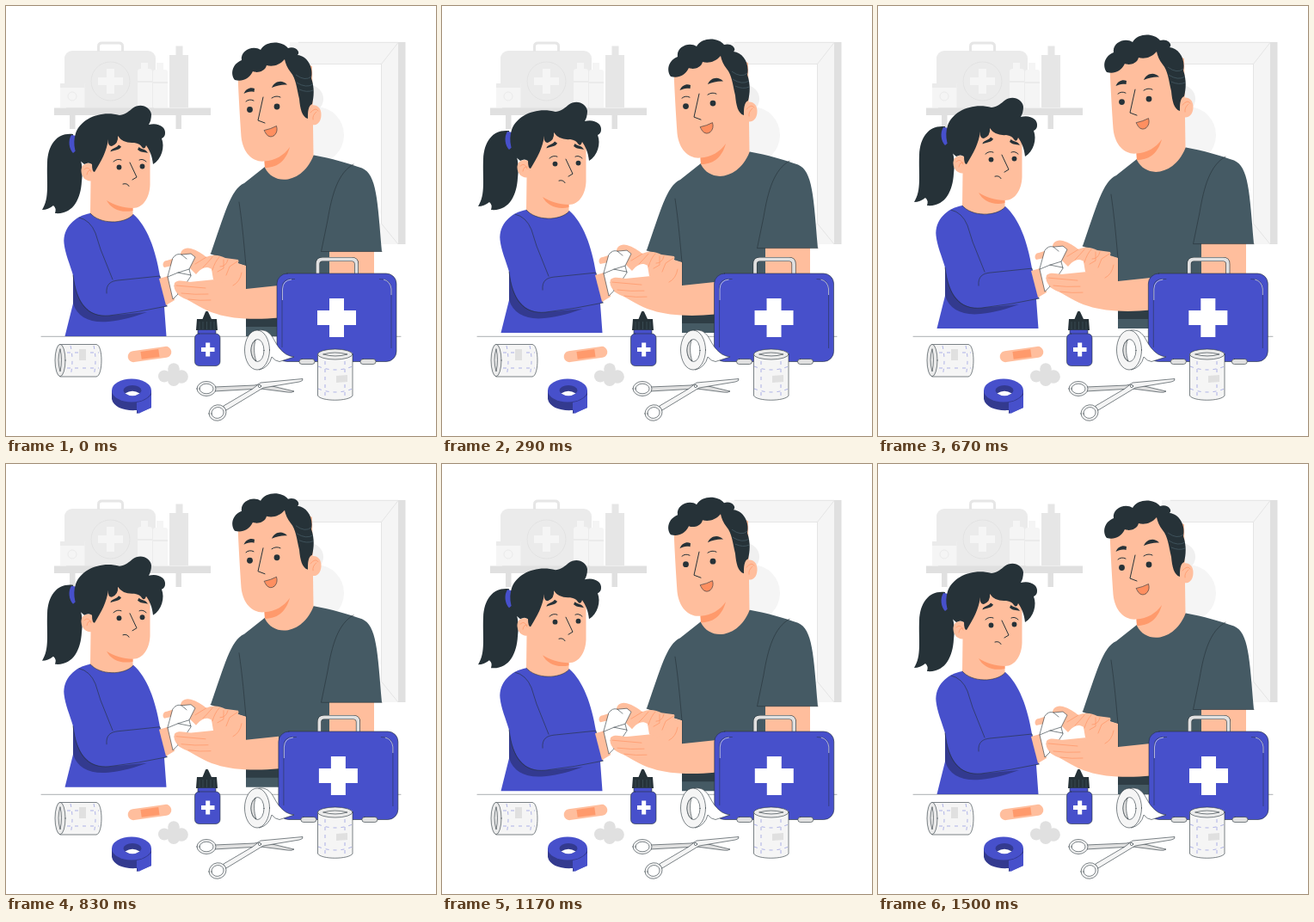
Animation, 500 px wide and 500 px high, one loop 1540 ms. Source, as an HTML page:

```html
<!DOCTYPE html>
<html lang="en">
<head>
<meta charset="utf-8">
<title>First aid</title>
<style>
html, body { margin: 0; width: 100%; height: 100%; overflow: hidden; background: #fff; }
svg { display: block; width: 100vw; height: 100vh; }
.skin { fill: #ffbe9d; }
.peach { fill: #ff9a6c; }
.hair { fill: #263238; }
.blue { fill: #4750cb; }
.navy { fill: #333a8f; }
.shirt { fill: #455a64; }
.g1 { fill: #f5f5f5; }
.g2 { fill: #ebebeb; }
.g3 { fill: #e0e0e0; }
.w { fill: #fff; }
.ink { fill: none; stroke: #263238; stroke-width: 1; stroke-linecap: round; stroke-linejoin: round; }
.fine { stroke-width: .6; }
.thin { stroke: #263238; stroke-width: .6; stroke-linejoin: round; stroke-linecap: round; }
.crease { fill: none; stroke: #ff9a6c; stroke-width: .8; stroke-linecap: round; }
.stitch { fill: none; stroke: #8f94e0; stroke-width: .7; stroke-dasharray: 4 5; }
</style>
</head>
<body>
<svg viewBox="0 0 500 500" preserveAspectRatio="none">
  <!-- room -->
  <g>
    <path class="g1" d="M330 42H456V277H330Z"/>
    <path class="w" d="M345 67.500H436.500V253H345Z"/>
    <path class="g3" d="M456 42h8.500v235h-8.500Z"/>
    <path d="M340 42.300H456M345 67.500H436.500V253M436.500 67.500L456 42.500M436.500 253L456 277" fill="none" stroke="#e0e0e0" stroke-width=".8"/>
    <circle class="g1" cx="360" cy="150" r="33"/>
    <circle fill="#f0f0f0" cx="353" cy="108" r="16"/>
    <rect class="g2" x="68" y="52" width="106" height="70" rx="9"/>
    <path d="M107.500 53V47q0-4 4-4h20q4 0 4 4v6" fill="none" stroke="#e6e6e6" stroke-width="3"/>
    <circle cx="121.500" cy="87.500" r="22.500" fill="none" stroke="#e0e0e0" stroke-width=".8"/>
    <path class="g1" d="M117 73h9v10h10v9h-10v10h-9v-10h-10v-9h10Z"/>
    <path class="g1" d="M63 90h28.500v28H63Z"/>
    <path class="g2" d="M63 90h28.500v5H63Z"/>
    <circle cx="77" cy="105" r="5" fill="none" stroke="#ebebeb"/>
    <path class="g1" d="M157 66h8v7h2q3 0 3 3v42h-17V76q0-3 3-3h1Z"/>
    <path class="g1" d="M175 66h8v8h2q3 0 3 3v41h-17V77q0-3 3-3h1Z"/>
    <path class="g2" d="M153 87h17v2h-17ZM171 88h17v2h-17Z"/>
    <path fill="#e6e6e6" d="M197.500 46.500h8V57h6.500v61h-22V57h7.500Z"/>
    <path class="g3" d="M56 118.500H238V127H204v16h-6.500V127H80.500v16H74V127H56Z"/>
  </g>

  <g id="people">
    <!-- man -->
    <path class="skin" d="M376 280H428V330H376Z"/>
    <path class="shirt" d="M301 187L277 206C261 213 254 243 238 288L279 302V384H376V285.500H437C432 225 431 196 414 188.500C398 183 378 177 358 173.500Z"/>
    <path fill="#2e3d45" d="M279 358H330V373H279Z"/>
    <path class="ink fine" d="M271 228C275 255 277 280 279 302V330M404 184C386 194 379 219 374 249L366.500 285.500H437M238 288L279 302"/>
    <path class="skin" d="M269.500 80C270.500 105 272 130 273.500 152C275.500 172 288 182 300.500 180.500L301 188C312 210 345 206 357.500 174L356 70L320 55Z"/>
    <path class="peach" d="M300.500 180.500C313 179.500 323 174 330 164C325 182 314 188 301 188Z"/>
    <path class="skin" d="M350 119C356 112 367 115 366.500 127C366 138 358 141 351 136Z"/>
    <path class="crease" d="M354 124Q360 117 363 122M357 132Q356 127 361 123"/>
    <path class="hair" d="M266 86C261 80 262 68 274 63C272 51 288 45 296 51C302 40 321 40 328 49C337 46 343 54 339 57C350 58 358 71 355 84C359 95 358 106 356 114C351 116 351 124 351 131C344 129 342 119 341 108C338 95 337 84 331 77C327 72 325 67 324 62C318 69 310 71 303 69C301 77 291 78 287 76C282 86 274 88 266 86Z"/>
    <path d="M337 80Q348 88 355 82M338 89Q349 96 357 91M341 97Q350 101 357 98" fill="none" stroke="#455a64" stroke-width=".8"/>
    <path class="hair" d="M276.500 102C279 95.500 285 94 289 96L288.500 100C284 99 280 100 276.500 102ZM309 95C312 87.500 321 85 327 91.500C321 91 315 92.500 309 95Z"/>
    <circle class="hair" cx="283.500" cy="120.500" r="3.400"/>
    <circle class="hair" cx="315" cy="117" r="3.400"/>
    <path class="ink" d="M279 111Q283 107.500 288 110M309 107Q314 103.500 319 106M299 106L293 133L301 136"/>
    <path class="thin" fill="#ff8f60" d="M300.500 144.500Q308 143 314.500 139.500Q316.500 146 312 150.500Q307 154 303 149.500Z"/>

    <!-- girl -->
    <path class="hair" d="M78 149C60 147 49 160 48 182C47 205 51 223 42 237Q49 237 55 232Q59 235 57 241C78 243 87 224 88 204C90 188 88 178 81 166Z"/>
    <path class="blue" d="M76 150C72 156 73 166 78 171L84 166L82 151Z"/>
    <path class="blue" d="M98 241C80 244 66 258 67.500 276C69 289 74 299 78 313V346L68.500 384H186.500L184 350L187 349L179 314C174 283 164 256 148 242Z"/>
    <path class="navy" d="M78 313V346C83 362 98 369 119 367C137 365 150 361 164 356L120 360C98 362 82 347 78 313Z"/>
    <path class="ink fine" d="M85 246Q98 249 104 264L110 283L124 318M117 334C116 323 122 320 130 319L179 314L187 349M78 313C82 347 95 362 120 360Q155 356 187 349"/>
    <path class="skin" d="M99 165L98 241C109 254 137 254 147.500 243V235C160 235 167 222 167.500 208V160L130 145Z"/>
    <path class="ink fine" d="M98 241C109 254 137 254 147.500 243"/>
    <path class="peach" d="M117 226C126 232 136 234.500 147.500 235V238C134 241 122 236 117 226Z"/>
    <path class="skin" d="M102 185C95 180 87 184 87.500 192C88 200 94 205 101 203Z"/>
    <path class="crease" d="M91 190Q96 185 99 193M94 196Q95 190 99 191"/>
    <path class="hair" d="M91 184C80 176 77 160 81 148C87 131 110 121 132 127C140 126 143 122 147 119C156 112 168 117 169 126Q169 133 166 138C177 135 186 141 185 148Q185 152 181 154C185 164 181 178 171 184C170 174 167 168 163 162Q161 168 158 164Q156 160 149 159Q136 160 130 151Q131 160 123 163Q118 163 119 155C117 169 111 180 103 193Q100 193 100 184Q96 181 91 184Z"/>
    <path class="hair" d="M121.500 169.500C122 165 128 166 131 161.500L134 163.500C132 168 126 167 121.500 169.500ZM153 167L154.500 164C158 167.500 162 165.500 165 171C160 169.500 157 170.500 153 167Z"/>
    <circle class="hair" cx="131.500" cy="187.500" r="2.900"/>
    <circle class="hair" cx="158.500" cy="186.500" r="2.900"/>
    <path class="ink" d="M125 181Q129 177 134 179M155 179Q159 177 163 181M144 182L152 199L147 202M136 207Q141 205.500 143 209.500"/>

    <!-- hands -->
    <path class="skin" d="M178 317L192 313L196 342L186 348Z"/>
    <path class="skin" d="M196 323C200 319 207 320 213 321L243 318L262 297L279 302V329L317 325V362.500C291 365 262 364 245 358C229 354 218 344 207 340C198 336 193 329 196 323Z"/>
    <path class="skin" d="M184 304C181 301 183 296 187 296L203 291C202 284 208 280 215 282C222 284 228 288 233 292C241 288 249 290 255 293L270 295C272 299 267 301 264 306L251 322L241 318L239 306C232 301 226 306 221 312L212 303L198 301Z"/>
    <path class="crease" d="M233 292L220 300M240 292Q234 299 229 304M248 292Q243 297 240 307M253 295V305L246 309M258 295Q256 303 249 303M269 297L260 303L256 313M264 325Q272 321 274 310"/>
    <path class="w thin" d="M194 293Q198 287 204 289L215 288L220 292L213 306L215 314L209 323L196 325L200 335L194 341L188 315Z"/>
    <path class="ink fine" d="M188 315L200 310L213 306M204 289L210 294M200 310L215 313"/>
    <path class="skin" d="M196 322C200 318 207 320 214 321L233 324V334L206 338C198 335 194 329 196 322Z"/>
    <path class="crease" d="M198 325L232 328M204 334Q220 336 235 335M212 341Q226 343 238 342"/>
  </g>

  <path class="ink" style="stroke-width:.4" d="M41 384.300H459"/>

  <g id="kit">
    <path d="M362.500 312V300q0-5.500 5.500-5.500h34q5.500 0 5.500 5.500v12" fill="none" stroke="#263238" stroke-width="5"/>
    <path d="M362.500 312V300q0-5.500 5.500-5.500h34q5.500 0 5.500 5.500v12" fill="none" stroke="#e0e0e0" stroke-width="3.800"/>
    <rect class="blue thin" x="315" y="311" width="139" height="102.500" rx="12"/>
    <path d="M321 397V328Q321 318 331 317.500H336M434 317.500Q448 317 448 329V398" fill="none" stroke="#263238" stroke-width=".5"/>
    <path d="M321.500 342V329Q322 319 332 318M448 336V329Q447 320 439 318" fill="none" stroke="#fff" stroke-width=".6"/>
    <path class="w" d="M376 340h17v14h14v17h-14v14h-17v-14h-14v-17h14Z"/>
    <rect class="g3 thin" x="341" y="410.500" width="18" height="6" rx="3"/>
    <rect class="g3 thin" x="412" y="410.500" width="18" height="6" rx="3"/>
  </g>

  <!-- table items -->
  <g>
    <path class="g1 thin" d="M63 393.500H105C113 394 113 430 105 431H63Z"/>
    <ellipse class="g2 thin" cx="63" cy="412" rx="6" ry="18.700"/>
    <path class="ink fine" d="M63 399Q59 411 63 425Q66 411 63 399"/>
    <path class="stitch" d="M71 403H108M71 421H108M75 395Q79 412 75 430M102 395Q106 412 102 430"/>
    <path class="g3" d="M85 399h8v13h-8Z"/>

    <g transform="rotate(-8 167 405)">
      <rect class="skin" x="141.500" y="398.500" width="51" height="13" rx="6.500"/>
      <rect class="peach" x="157" y="400.500" width="21" height="9"/>
    </g>

    <path class="hair" d="M232 355.500q1.500-1.500 3 0L239 364h6l1 13h-25l1-13h6.500Z"/>
    <path d="M225 367v9M229 367v9M233.500 367v9M238 367v9M242 367v9" stroke="#455a64" stroke-width=".6"/>
    <rect class="blue thin" x="223" y="376.500" width="21" height="5" rx="1"/>
    <rect class="blue thin" x="219.500" y="381" width="29.500" height="37.500" rx="5"/>
    <path class="w" d="M232.200 391.500h5v5.500h5.300v5h-5.300v5.500h-5v-5.500H227v-5h5.200Z"/>

    <g class="g3">
      <circle cx="195" cy="422" r="6.800"/><circle cx="184" cy="430.500" r="7"/>
      <circle cx="204" cy="431" r="7.800"/><circle cx="195" cy="435" r="7"/>
      <circle cx="194.500" cy="428" r="7"/>
    </g>

    <path class="navy" d="M123 447V457C125 467 138 471 152 470V474L169 467V447Z"/>
    <path class="blue" d="M152 461Q163 459 169 452V467L154 474L152 469Z"/>
    <ellipse class="blue" cx="146" cy="447" rx="23" ry="13.500"/>
    <ellipse class="navy" cx="147" cy="447" rx="10.500" ry="6"/>
    <path class="w" d="M138.500 450.500Q147 445 155.500 450.500Q147 456 138.500 450.500Z"/>

    <g class="g1 thin">
      <path class="g3" d="M242 443L289 441L297 439L335 448Q333 450 327 449L296 445L242 448Z"/>
      <path d="M253 465L287 445L296 438L345 433.500Q346 436 341 437L299 444L256 470Z"/>
      <path fill-rule="evenodd" d="M222 445a11 8.500 0 1 0 22 0a11 8.500 0 1 0 -22 0ZM225 445a8 5.800 0 1 1 16 0a8 5.800 0 1 1 -16 0Z"/>
      <path fill-rule="evenodd" d="M236 474a10 9 -20 1 0 20 -2a10 9 -20 1 0 -20 2ZM239 474a7 6.200 -20 1 1 14 -2a7 6.200 -20 1 1 -14 2Z"/>
      <circle class="w" cx="295" cy="442" r="1.600"/>
    </g>

    <path class="w thin" d="M294 377C309 375 311 390 318 398Q325 407 335 408L318 413.500Q313 413 309 408Q306 420 295 423Z"/>
    <ellipse class="g1 thin" cx="292" cy="400" rx="14.500" ry="23"/>
    <ellipse class="w thin" cx="292.500" cy="400.500" rx="7.500" ry="13"/>
    <path class="g3 thin" d="M290 388.500C283 393 283 408 291 413C288 405 288 395 290 388.500Z"/>

    <path class="g1 thin" d="M362.500 405V453C366 460 399 460 403 453V405Z"/>
    <ellipse class="g2 thin" cx="382.800" cy="405" rx="20.300" ry="6"/>
    <path class="ink fine" d="M369 405Q382 401 397 405Q383 409 369 405"/>
    <path class="stitch" d="M371 413V456M394 413V456M363 419Q383 427 403 419M363 445Q383 453 403 445"/>
    <path class="g3" d="M384 430l13-1v8l-13 1Z"/>
  </g>
</svg>
<script>
const LOOP = 1540, CYCLE = 1500, LEAD = 24, FPS = 24, LIFT = 10;
const SHAKE = [0, -1, 2, -4, 4, -4, 4, -4, 2, -1, 0];
const people = document.getElementById('people');
const kit = document.getElementById('kit');

function lift(p) {
  return -LIFT * (1 - Math.abs(1 - 2 * p));
}

function shake(p) {
  const x = p * 10, i = Math.floor(x);
  return SHAKE[i] + (SHAKE[i + 1] - SHAKE[i]) * (x - i);
}

// Poses advance at a fixed rate; both motions share one cycle.
function draw(now) {
  const step = Math.floor(((now % LOOP) + 4) * FPS / 1000);
  const p = ((step * 1000 / FPS + LEAD) % CYCLE) / CYCLE;
  const rest = LEAD / CYCLE;
  people.setAttribute('transform', `translate(0 ${lift(p) - lift(rest)})`);
  kit.setAttribute('transform', `translate(${shake(p) - shake(rest)} 0)`);
}

const start = performance.now();
function tick() {
  draw(performance.now() - start);
  requestAnimationFrame(tick);
}
tick();
</script>
</body>
</html>
```
